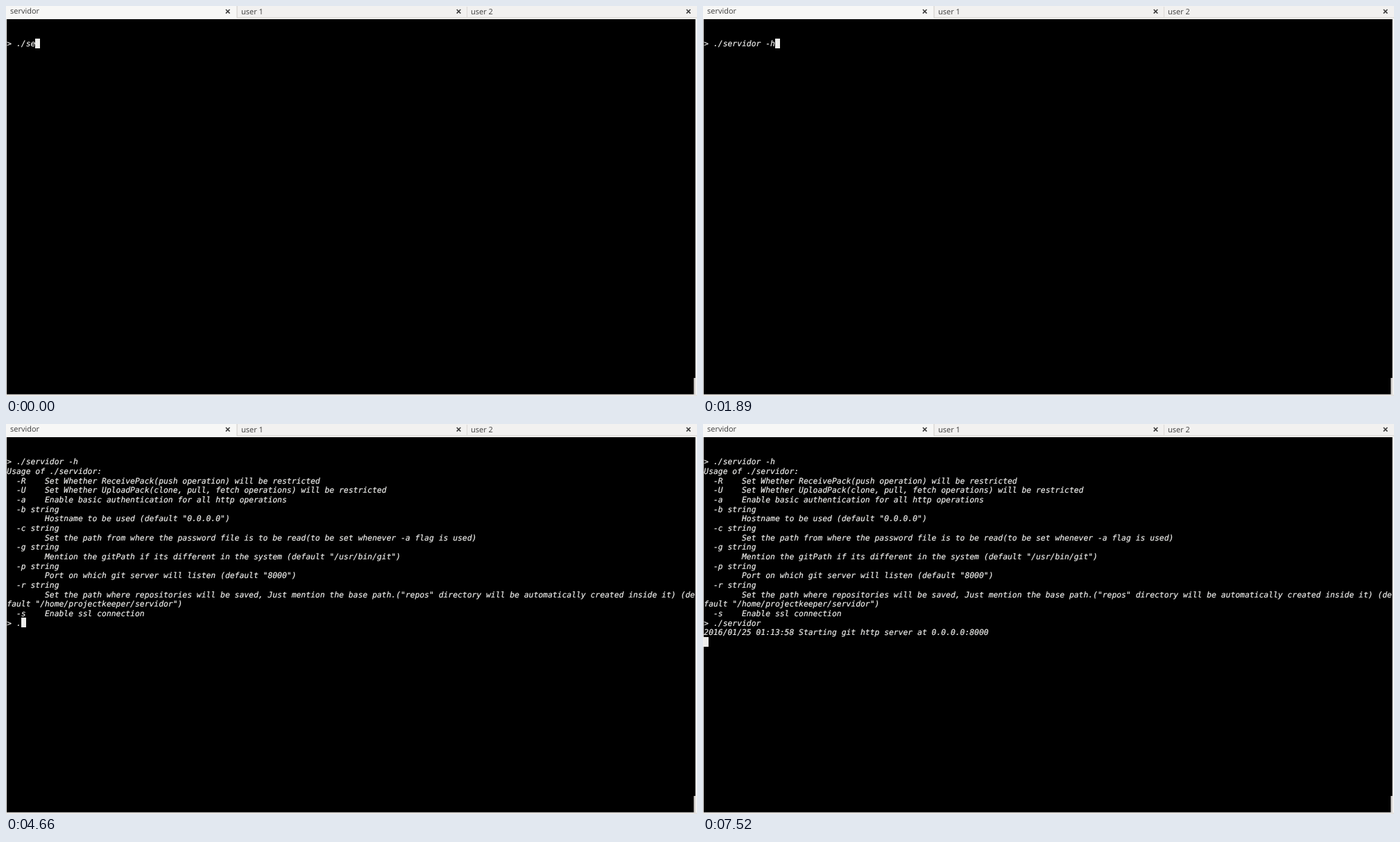
Animation, 996 px wide and 562 px high, one loop 8 s. Source, as an HTML page:

```html
<!DOCTYPE html>
<html lang="en">
<head>
<meta charset="utf-8">
<title>Terminal</title>
<style>
  html, body { margin: 0; width: 100%; height: 100%; overflow: hidden; background: #f2f1f0; }
  svg { display: block; width: 996px; height: 562px; }
  text { text-rendering: geometricPrecision; white-space: pre; }
  .tab { font: 11px "Open Sans", "Noto Sans", sans-serif; fill: #3c3c3c; }
  .row {
    font: italic 11.361px "DejaVu Sans Mono", "Noto Sans Mono", monospace;
    fill: #eeeeec; stroke: #eeeeec; stroke-width: 0.2;
  }
  .close { stroke: #3c3c3c; stroke-width: 1.6; }
</style>
</head>
<body>
<svg id="stage" viewBox="0 0 996 562" xmlns="http://www.w3.org/2000/svg">
  <rect width="996" height="562" fill="#f2f1f0"/>
  <rect width="333" height="19" fill="#f7f7f6"/>
  <rect x="333" y="16.6" width="663" height="1" fill="#cbc8c4"/>
  <rect x="333" y="17.6" width="663" height="1.4" fill="#f7f7f6"/>
  <rect x="332.6" width="0.8" height="17" fill="#c6c3bf"/>
  <rect x="664" y="1" width="0.8" height="15" fill="#d6d3d0"/>
  <rect y="560.6" width="996" height="0.8" fill="#d0cdca"/>
  <rect x="1" y="19" width="992.7" height="540.6" fill="#000"/>
  <rect x="991.4" y="536" width="2.6" height="24" fill="#d8d6d3"/>
  <g id="tabs"></g>
  <rect id="cursor" width="7" height="14" fill="#eeeeec"/>
  <g id="rows"></g>
</svg>
<script>
const LOOP = 8000, LEFT = 1.3, TOP = 47.2, COL = 6.84, ROW = 13.66;

const TABS = [["servidor", 6, 11.2, 319.7], ["user 1", 339, 11.9, 652.5], ["user 2", 670, 11.9, 983.7]];

const HELP = `Usage of ./servidor:
  -R    Set Whether ReceivePack(push operation) will be restricted
  -U    Set Whether UploadPack(clone, pull, fetch operations) will be restricted
  -a    Enable basic authentication for all http operations
  -b string
        Hostname to be used (default "0.0.0.0")
  -c string
        Set the path from where the password file is to be read(to be set whenever -a flag is used)
  -g string
        Mention the gitPath if its different in the system (default "/usr/bin/git")
  -p string
        Port on which git server will listen (default "8000")
  -r string
        Set the path where repositories will be saved, Just mention the base path.("repos" directory will be automatically created inside it) (de
fault "/home/projectkeeper/servidor")
  -s    Enable ssl connection
`;
const LOG = "2016/01/25 01:13:58 Starting git http server at 0.0.0.0:8000\n";

const FIRST = "> ./servidor -h";
const SECOND = FIRST + "\n" + HELP + "> ./servidor ";

// Each step: start in ms, full text, characters shown.
const before = (text, n) => text.length - n;
const STEPS = [
  [0, FIRST, 6],
  [440, FIRST, 13],
  [1530, FIRST, 14],
  [1890, FIRST, 15],
  [2490, SECOND, before(SECOND, 11)],
  [4660, SECOND, before(SECOND, 10)],
  [4750, SECOND, before(SECOND, 9)],
  [5210, SECOND, before(SECOND, 8)],
  [5490, SECOND, before(SECOND, 7)],
  [5750, SECOND, SECOND.length],
  [7520, SECOND + "\n" + LOG, Infinity]
];

function add(parent, name, attrs, content = "") {
  const el = document.createElementNS("http://www.w3.org/2000/svg", name);
  for (const key in attrs) el.setAttribute(key, attrs[key]);
  el.textContent = content;
  return document.getElementById(parent).appendChild(el);
}

for (const [label, x, y, cross] of TABS) {
  add("tabs", "text", { class: "tab", x, y }, label);
  add("tabs", "path", { class: "close", d: `M${cross - 2.8} 5l5.6 5.6m0-5.6l-5.6 5.6` });
}

const rows = Array.from({ length: 20 }, (_, i) =>
  add("rows", "text", { class: "row", x: LEFT, y: TOP + 11.2 + i * ROW }));
const cursor = document.getElementById("cursor");
let shown = null;

function draw() {
  const time = performance.now() % LOOP;
  const step = STEPS.findLast(([start]) => start <= time);
  if (step !== shown) {
    shown = step;
    const lines = step[1].slice(0, step[2]).split("\n");
    rows.forEach((row, i) => row.textContent = lines[i] || "");
    const last = lines.length - 1;
    // The block cursor sits on whole pixels.
    cursor.setAttribute("x", Math.round(LEFT + lines[last].length * COL));
    cursor.setAttribute("y", Math.round(TOP + last * ROW));
  }
  requestAnimationFrame(draw);
}
draw();
</script>
</body>
</html>
```
